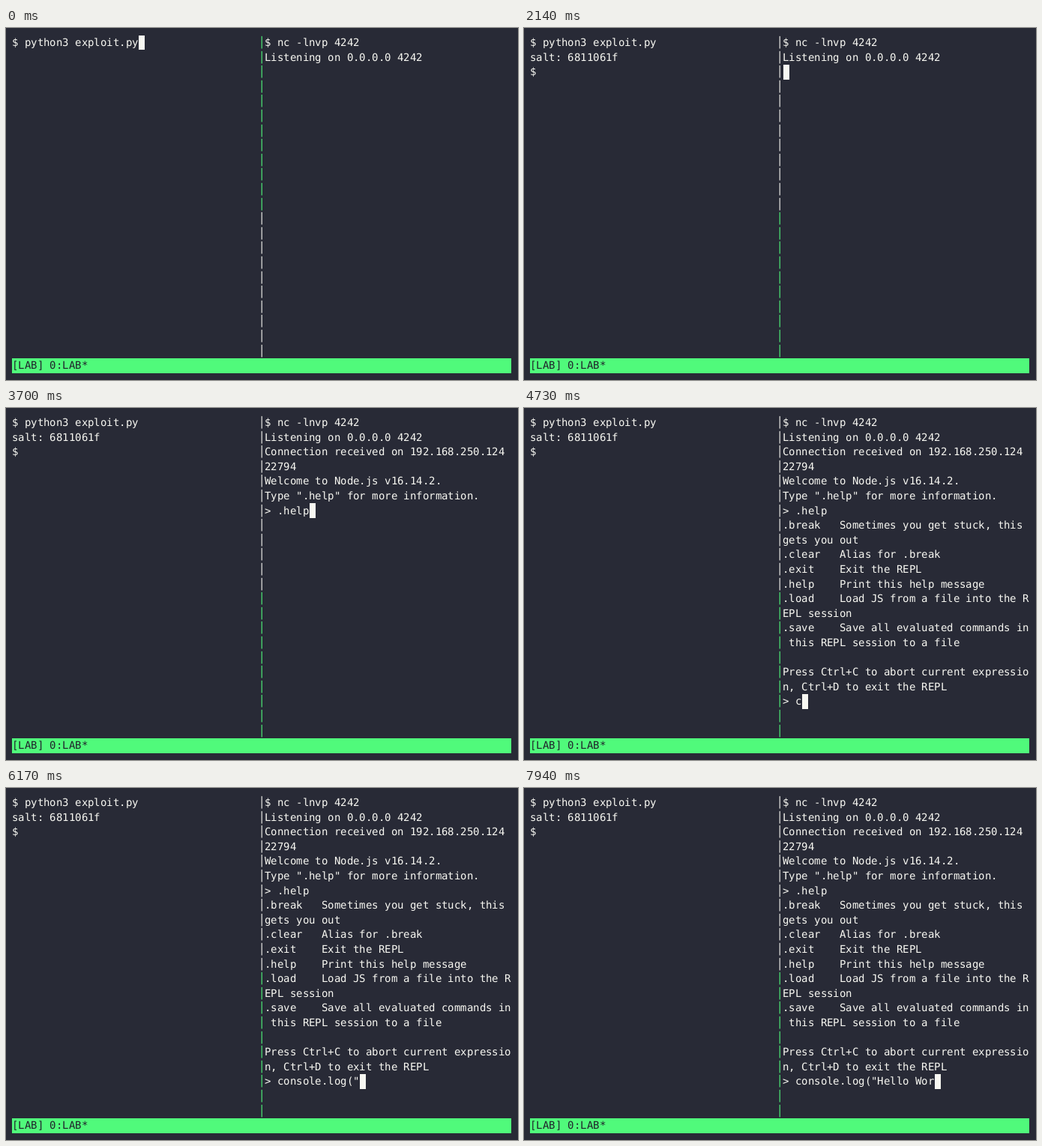
An HTML page with a canvas that plays this animation: 683x470 px, repeating every 8000 ms.

```html
<!DOCTYPE html>
<html lang="en">
<head>
<meta charset="utf-8">
<title>Terminal session</title>
<style>
  html, body { margin: 0; width: 100%; height: 100%; overflow: hidden; background: #282a36; }
  canvas { display: block; }
</style>
</head>
<body>
<canvas id="screen" width="683" height="470"></canvas>
<script>
const LOOP = 8000;
const FONT_SIZE = 14, CELL_W = 8.428, CELL_H = 19.6;
const ASCENT = 14.65; // from the top of a row to its baseline
const BG = '#282a36', FG = '#f8f8f2', GREEN = '#50fa7b', BLACK = '#21222c';
const COLS = 79, STATUS_ROW = 22, DIVIDER = 39, RIGHT = 40;

const ctx = document.getElementById('screen').getContext('2d');
ctx.font = `${FONT_SIZE}px "DejaVu Sans Mono", monospace`;
ctx.textBaseline = 'alphabetic';
ctx.textRendering = 'geometricPrecision';

// One-cell horizontal padding, half-a-row vertical padding.
const left = col => CELL_W * (col + 1);
const top_ = row => CELL_H * (row + 0.5);

function fillCells(col, row, count, color) {
  const x = Math.round(left(col)), y = Math.round(top_(row));
  ctx.fillStyle = color;
  ctx.fillRect(x, y, Math.round(left(col + count)) - x, Math.round(top_(row + 1)) - y);
}

// Glyphs sit on whole pixels, rounded down.
function print(col, row, text, color = FG) {
  const y = Math.floor(top_(row) + ASCENT);
  ctx.fillStyle = color;
  [...text].forEach((ch, i) => {
    if (ch !== ' ') ctx.fillText(ch, Math.floor(left(col + i)), y);
  });
}

// Terminal output: [time, column, row, lines]
const output = [
  [0, 0, 0, ['$ python3 exploit.py']],
  [0, RIGHT, 0, ['$ nc -lnvp 4242', 'Listening on 0.0.0.0 4242']],
  [590, 0, 1, ['salt: 6811061f']],
  [2140, 0, 2, ['$']],
  [2230, RIGHT, 2, ['Connection received on 192.168.250.124', '22794']],
  [2280, RIGHT, 4, ['Welcome to Node.js v16.14.2.', 'Type ".help" for more information.', '>']],
  [3890, RIGHT, 7, [
    '.break   Sometimes you get stuck, this',
    'gets you out',
    '.clear   Alias for .break',
    '.exit    Exit the REPL',
    '.help    Print this help message',
    '.load    Load JS from a file into the R',
    'EPL session',
    '.save    Save all evaluated commands in',
    ' this REPL session to a file',
    '',
    'Press Ctrl+C to abort current expressio',
    'n, Ctrl+D to exit the REPL',
    '>'
  ]]
];

// Typed input: one key time per character
const inputs = [
  { row: 6, text: '.help', keys: [3050, 3330, 3480, 3530, 3700] },
  { row: 19, text: 'console.log("Hello Wor', keys: [
    4730, 4800, 4880, 4960, 5050, 5220, 5290, 5410, 5630, 5770, 5840,
    6000, 6170, 6470, 6840, 6910, 7080, 7240, 7390, 7560, 7740, 7940] }
];
const INPUT_COL = RIGHT + 2;
const typedCount = (input, t) => input.keys.filter(k => k <= t).length;

// Cursor position outside of typing: [time, column, row]
const cursorStops = [
  [0, 20, 0], [500, 0, 1], [590, 0, 2], [1160, RIGHT, 2],
  [2230, RIGHT, 4], [2280, INPUT_COL, 6], [3890, INPUT_COL, 19]
];

function draw(t) {
  ctx.fillStyle = BG;
  ctx.fillRect(0, 0, 683, 470);

  const rightActive = t >= 1160;
  for (let row = 0; row < STATUS_ROW; row++) {
    print(DIVIDER, row, '│', (row < 12) !== rightActive ? GREEN : FG);
  }

  for (const [time, col, row, lines] of output) {
    if (t >= time) lines.forEach((line, i) => print(col, row + i, line));
  }

  let [, cursorCol, cursorRow] = cursorStops.filter(stop => stop[0] <= t).pop();
  for (const input of inputs) {
    const count = typedCount(input, t);
    print(INPUT_COL, input.row, input.text.slice(0, count));
    if (input.row === cursorRow) cursorCol += count;
  }
  fillCells(cursorCol, cursorRow, 1, FG);

  fillCells(0, STATUS_ROW, COLS, GREEN);
  print(0, STATUS_ROW, '[LAB] 0:LAB*', BLACK);
}

const start = performance.now();
function tick() {
  draw((performance.now() - start) % LOOP);
  requestAnimationFrame(tick);
}
tick();
</script>
</body>
</html>
```
